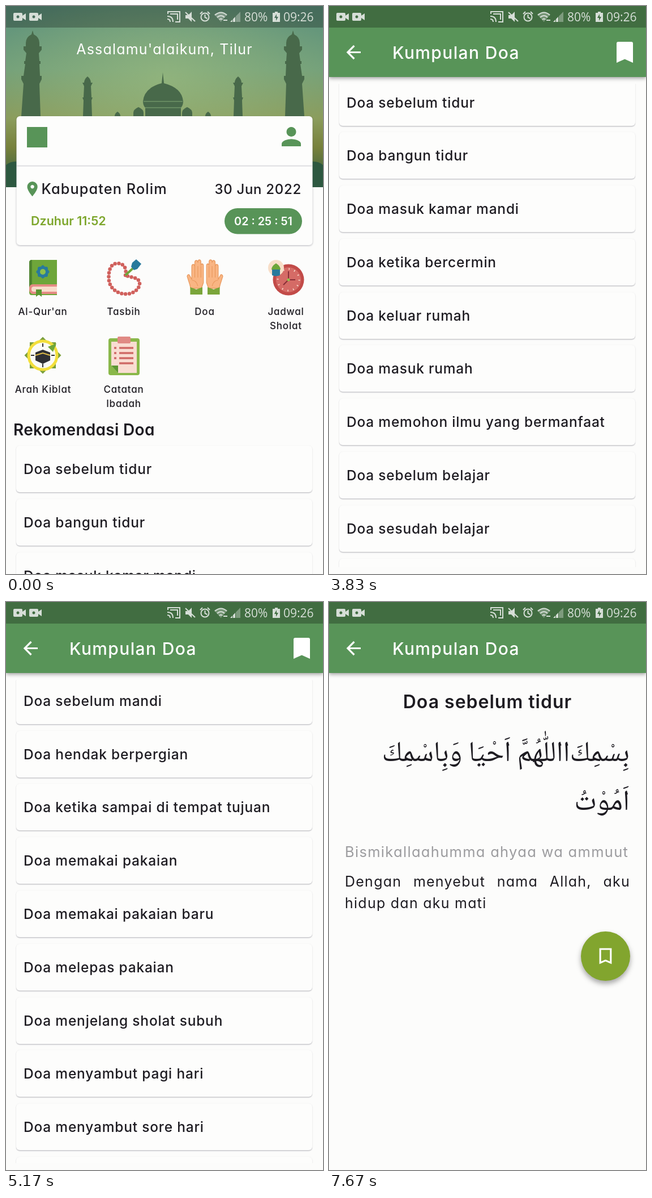
These frames come from a looping animation (560x1000 px, 8 s). An HTML page:

```html
<!DOCTYPE html>
<html lang="id">
<head>
<meta charset="utf-8">
<title>Doa</title>
<style>
:root { --green: #589458; --lime: #82a52e; --paper: #fcfcfb; --ink: #1e1c22; }
html, body { margin: 0; width: 100%; height: 100%; overflow: hidden; background: var(--paper); }
body { font-family: Inter, "Open Sans", sans-serif; font-feature-settings: "cv11"; font-optical-sizing: none; color: var(--ink); }
#stage { position: relative; width: 560px; height: 1000px; overflow: hidden; }
#stage > *, .page > * { position: absolute; }
.page { inset: 0; background: var(--paper); overflow: hidden; }
.scrim { inset: 0; background: #000; opacity: 0; }
svg { display: block; left: 0; top: 0; overflow: visible; }

.card { position: relative; box-sizing: border-box; width: 523px; height: 82px; margin: 0 0 11.8px 6px; padding-left: 13px;
  border-radius: 6px; background: #fdfdfc; font: 500 24.5px/82px Inter, "Open Sans", sans-serif; letter-spacing: .8px; white-space: nowrap;
  box-shadow: 0 1.5px 1.5px rgba(60, 60, 80, .28), 0 0 2px rgba(0, 0, 0, .07); }
.rows { padding-top: 6.5px; }
#view { left: 12px; top: 137px; width: 536px; height: 851px; overflow: hidden; }
#picks { left: 12px; top: 774px; }
.press { background: #000; opacity: 0; position: absolute; inset: 0; border-radius: 6px; }

.bar { left: 0; top: 0; width: 560px; height: 125px; background: var(--green); box-shadow: 0 2px 7px rgba(0, 0, 0, .4); }
.bar b { position: absolute; left: 112px; top: 62px; font: 500 30px/40px Inter, "Open Sans", sans-serif; letter-spacing: 1.35px; color: #fff; white-space: nowrap; }
.bar svg { position: absolute; }

.home text { font-size: 24px; font-weight: 500; letter-spacing: .7px; fill: var(--ink); }
.home .label text { font-size: 17px; letter-spacing: .8px; text-anchor: middle; }
.home .timer text { font-size: 19.8px; font-weight: 600; letter-spacing: 0; fill: #fff; text-anchor: middle; }

h1 { margin: 0; width: 560px; top: 156px; text-align: center; font: 600 32px/40px Inter, "Open Sans", sans-serif; letter-spacing: 1px; }
.arabic { margin: 0; right: 29px; top: 226px; direction: rtl; white-space: nowrap; font: 50.5px/86px "Noto Naskh Arabic", "DejaVu Sans", sans-serif; }
.latin, .meaning { margin: 0; left: 28px; font-size: 25px; line-height: 37.5px; letter-spacing: 1.25px; }
.latin { top: 421px; font-size: 25.5px; letter-spacing: 1.3px; color: #9c9c9f; white-space: nowrap; }
.meaning { top: 474px; width: 504px; text-align: justify; }
.fab { left: 445px; top: 580px; width: 87px; height: 87px; border-radius: 50%; background: var(--lime); box-shadow: 0 5px 10px rgba(0, 0, 0, .35); }
</style>
</head>
<body>
<div id="stage">

<div class="page home" id="home">
  <svg width="560" height="1000">
    <defs>
      <linearGradient id="sky" x2="0" y2="1">
        <stop offset="0" stop-color="#5d917c"/><stop offset=".35" stop-color="#73a07a"/>
        <stop offset=".62" stop-color="#8b9c5c"/><stop offset=".78" stop-color="#77813c"/><stop offset="1" stop-color="#2f5c42"/>
      </linearGradient>
      <radialGradient id="glare" cx=".5" cy=".4" r=".55">
        <stop offset="0" stop-color="#98b97f" stop-opacity=".75"/><stop offset="1" stop-color="#98b97f" stop-opacity="0"/>
      </radialGradient>
      <g id="towers">
        <path d="M47 43l2 7q10 5 10 15v6h4v6l-5 6 1 14h2v5h-2l1 21h3v6l-4 8 2 57H27l4-57-4-8v-6h4l3-21h-2v-5h2l2-14-5-6v-6h4v-6q0-10 10-15z"/>
        <path d="M144 124q6 5 6 11h3l-3 6 1 20h2l-2 5 1 28h-16l1-28-2-5h2l1-20-3-6h3q0-6 6-11z"/>
        <path d="M225 194v-6q0-6 9-10 9 4 9 10v6zM192 194q0-5 5-8 5 3 5 8z"/>
      </g>
      <g id="hand" transform="translate(32 0) scale(.9 1)">
        <path d="M327 497l-2-7-5-14q1-4 4-3l5 8v-22q0-4 3-4t3 4v-7q0-4 3-4t3 4v-1q0-4 3-4t3 4v6q0-3 2.500-3t2.500 4v29l-4 10z" fill="#f9b583" stroke="#e8985c" stroke-width="1.300"/>
        <path d="M335 458v20m6-20v20m6-20v20m-17 5q8 0 11 10" fill="none" stroke="#e8985c" stroke-width="1.200"/>
        <path d="M326 495l12 4 12-4v13h-24z" fill="#7ba53a"/>
      </g>
    </defs>
    <rect width="560" height="319" fill="url(#sky)"/>
    <rect width="560" height="319" fill="url(#glare)"/>
    <g fill="#48694a">
      <use href="#towers"/><use href="#towers" transform="translate(554) scale(-1 1)"/>
      <path d="M277 117l2 19q32 8 34 32 0 7-4 11v15h-63v-15q-4-4-4-11 2-24 33-32z"/>
      <path d="M0 280q12-10 30-4h500q18-6 30 4v39H0z" fill="#2d5840"/>
    </g>
    <path d="M243 168h69M246 179h64" stroke="#6f9468" stroke-width="1.500"/>
    <text x="280" y="85" text-anchor="middle" style="fill:#fff;font-weight:400;font-size:25px;letter-spacing:1.2px">Assalamu'alaikum, Tilur</text>

    <rect x="18.500" y="194" width="523" height="227" rx="6" fill="#fdfdfc" style="filter:drop-shadow(0 1.500px 1.500px rgba(50,50,70,.35))"/>
    <path d="M19 281.500h522" stroke="#dedee2" stroke-width="2"/>
    <g fill="#589458">
      <rect x="37" y="213" width="36" height="36"/>
      <path transform="translate(478.500 204.500) scale(2.125)" d="M12 4a4 4 0 1 0 .01 0zM12 14c-2.700 0-8 1.300-8 4v2h16v-2c0-2.700-5.300-4-8-4z"/>
      <path transform="translate(31 306.500) scale(1.300)" fill-rule="evenodd" d="M12 2a7 7 0 0 0-7 7c0 5.300 7 13 7 13s7-7.700 7-13a7 7 0 0 0-7-7zm0 4.500a2.500 2.500 0 1 1-.01 0z"/>
      <rect x="386" y="356" width="137" height="45.500" rx="22.750"/>
    </g>
    <text x="62.500" y="331" style="font-size:25.3px;letter-spacing:1.1px">Kabupaten Rolim</text>
    <text x="522" y="331" text-anchor="end">30 Jun 2022</text>
    <text x="44" y="386" style="font-size:21.5px;font-weight:600;letter-spacing:0;fill:#7da62c">Dzuhur 11:52</text>
    <g class="timer">
      <text id="before" x="454.500" y="386">02 : 25 : 51</text>
      <text id="after" x="454.500" y="386">02 : 25 : 50</text>
    </g>

    <!-- book -->
    <path d="M45 447h45v62H45q-4 0-4-5v-52q0-5 4-5z" fill="#6ea63a"/>
    <path d="M41 452q0-5 5-5v44q-5 0-5 6z" fill="#4f8430"/>
    <path d="M90 490H47q-6 0-6 8t6 9h43z" fill="#e58a84"/>
    <path d="M90 494H49q-4 0-4 4.500t4 4.500h41z" fill="#f8dccb"/>
    <path d="M53 499h10v13l-5-4-5 4z" fill="#5c9632"/>
    <g fill="#287a9c"><rect x="56" y="459" width="18" height="18" rx="3"/><rect x="56" y="459" width="18" height="18" rx="3" transform="rotate(45 65 468)"/></g>
    <circle cx="65" cy="468" r="5" fill="#8fc04a"/>
    <!-- beads -->
    <path d="M211 474C214 459 206 453 197 453 184 453 180 468 182 484 185 500 200 508 214 507 227 506 237 497 236 487 234 477 222 479 211 474" fill="none" stroke="#d0605c" stroke-width="6.500" stroke-linecap="round" stroke-dasharray="0 6.800"/>
    <path d="M211 474l13-12" stroke="#6ea63a" stroke-width="4"/>
    <path d="M221 459l5 6 6-2 7-9-9-8-7 6z" fill="#287a9c"/>
    <!-- hands -->
    <use href="#hand"/><use href="#hand" transform="translate(703) scale(-1 1)"/>
    <!-- clock -->
    <circle cx="499" cy="482" r="27.500" fill="#c24b48"/><circle cx="499" cy="482" r="22" fill="#d56b66"/>
    <circle cx="499" cy="482" r="19" fill="none" stroke="#fbe3d3" stroke-width="3" stroke-dasharray="1.500 8.448"/>
    <path d="M499 467v15h12M499 482l-9 9" fill="none" stroke="#8a2f38" stroke-width="2"/><circle cx="499" cy="482" r="2.500" fill="#8fc04a"/>
    <circle cx="477" cy="461" r="14" fill="#f8dec8"/>
    <path d="M469 464q0-6 8-11 8 5 8 11z" fill="#6ea63a"/><path d="M470 464h14v10q-7 3-14 0z" fill="#287a9c"/>
    <!-- compass -->
    <g fill="#7a9f3c"><rect x="42" y="592" width="46" height="46"/><rect x="42" y="592" width="46" height="46" transform="rotate(45 65 615)"/></g>
    <circle cx="65" cy="615" r="25" fill="#fbfbf6" stroke="#f3df3c" stroke-width="5"/>
    <path d="M65 594v6m0 30v6M44 615h6m30 0h6" stroke="#333" stroke-width="2"/>
    <path d="M74 600l15-6-6 15z" fill="#6ea63a"/>
    <path d="M52 610l13-5 13 5v14l-13 6-13-6z" fill="#303034"/><path d="M52 615l13-4 13 4" fill="none" stroke="#e0bd4a" stroke-width="2"/>
    <!-- clipboard -->
    <path d="M185 585h47q4 0 4 4v57q0 4-4 4h-47q-4 0-4-4v-57q0-4 4-4z" fill="#8ab84a"/>
    <path d="M186 591h45v55h-33l-12-13z" fill="#f9ddd2"/><path d="M186 633h12v13z" fill="#5c9632"/>
    <rect x="197" y="582" width="23" height="12" rx="2" fill="#e08a84"/>
    <path d="M200 602h25m-25 9h25m-25 9h25m-25 9h25" stroke="#cf6a66" stroke-width="3.500"/><path d="M191 602h4m-4 9h4m-4 9h4" stroke="#cf6a66" stroke-width="3.500"/>

    <g class="label">
      <text x="65" y="544">Al-Qur'an</text><text x="208" y="544">Tasbih</text><text x="351" y="544">Doa</text>
      <text x="494.500" y="544">Jadwal</text><text x="494.500" y="569">Sholat</text>
      <text x="65.500" y="681">Arah Kiblat</text><text x="208" y="681">Catatan</text><text x="208" y="706">Ibadah</text>
    </g>
    <text x="13" y="756" style="font-size:28px;font-weight:600;letter-spacing:.3px">Rekomendasi Doa</text>
    <rect id="tap" x="299" y="446" width="106" height="134" opacity="0"/>
  </svg>
  <div id="picks"></div>
</div>

<div class="scrim" id="shade1"></div>
<div class="page" id="list">
  <div id="view"><div class="rows" id="rows"></div></div>
  <svg width="560" height="1000">
    <circle id="spin" cx="280" cy="562" r="28" pathLength="100" fill="none" stroke="#589458" stroke-width="6.200" stroke-linecap="square" style="transform-origin:280px 562px"/>
    <path id="glow" d="M12 137H548V163Q280 199 12 163z" fill="#82a52e" fill-opacity=".12" style="transform-origin:280px 137px"/>
  </svg>
  <div class="bar"></div>
</div>

<div class="scrim" id="shade2"></div>
<div class="page" id="detail">
  <div class="bar"></div>
  <h1>Doa sebelum tidur</h1>
  <p class="arabic" lang="ar">بِسْمِكَ&zwnj;االلّٰهُمَّ اَحْيَا وَبِاسْمِكَ<br>اَمُوْتُ</p>
  <p class="latin">Bismikallaahumma ahyaa wa ammuut</p>
  <p class="meaning">Dengan menyebut nama Allah, aku hidup dan aku mati</p>
  <div class="fab"><svg width="87" height="87"><path transform="translate(24.800 24.800) scale(1.556)" fill="none" stroke="#fff" stroke-width="2" d="M6 4h12v15.500l-6-2.600-6 2.600z"/></svg></div>
</div>

<svg id="status" width="560" height="38">
  <rect width="560" height="38" fill="#000" fill-opacity=".26"/>
  <g fill="#d6ded7">
    <path id="cam" d="M15 12h12q2 0 2 2v3l6-4v12l-6-4v3q0 2-2 2H15q-2 0-2-2V14q0-2 2-2zm6 4.500a2.500 2.500 0 1 0 .01 0z"/>
    <use href="#cam" x="28"/>
    <path d="M317 16h5l6-6v18l-6-6h-5z"/>
    <path d="M368 15q11.500-9 23 0l-11.500 13z" opacity=".35"/>
    <path d="M396 28l4-4v4zM401 28v-5l4-4v9z"/><path d="M406 28V18l8-8v18z" opacity=".4"/>
    <path fill-rule="evenodd" d="M471 12h4v-2h5v2h4v16h-13zm7 2l-4 7h3v5l4-7h-3z"/>
    <g font-family="Open Sans, sans-serif" font-size="21"><text x="421" y="27">80%</text><text x="490" y="27">09:26</text></g>
  </g>
  <g fill="none" stroke="#d6ded7" stroke-width="2">
    <path d="M286 14v-4h21v18h-8M285 18q10 0 10 10M285 23q5 0 5 5M290 14h13v10"/>
    <path d="M317 11l17 16"/>
    <circle cx="351.500" cy="19.500" r="7"/><path d="M351.500 15v5l4 2M343 14l4-4m9 0l4 4"/>
    <path d="M369 16q11-9 21 0M373 20q7-6 13 0M377 24q3-3 5 0M384 25h7"/>
  </g>
</svg>
</div>

<script>
const $ = id => document.getElementById(id);
const FRAMES = 96;   // 12 per second, 8 seconds

// Animates one property through [frame, value] points, one step per frame.
function move(id, prop, points) {
  const all = [...points];
  if (all[0][0] > 0) all.unshift([0, all[0][1]]);
  all.push([FRAMES, all[all.length - 1][1]]);
  const keys = all.map(([frame, value], i) => ({
    offset: frame / FRAMES,
    [prop]: value,
    easing: i + 1 < all.length ? `steps(${all[i + 1][0] - frame})` : 'linear'
  }));
  $(id).animate(keys, { duration: 8000, iterations: Infinity, delay: -5 });
}

const show = (id, frame, value = 1) => move(id, 'opacity', [[frame - 1, 0], [frame, value]]);
const hide = (id, frame) => move(id, 'opacity', [[frame - 1, 1], [frame, 0]]);

// Page change: the new page grows and fades in over the old one.
function zoom(from, shade, to, start) {
  const at = values => values.map((v, i) => [start + i, v]);
  move(to, 'opacity', at([0, .8, 1]));
  move(to, 'transform', at([.85, .932, .989, .998, 1].map(s => `scale(${s})`)));
  move(from, 'scale', at(['1', '1.03', '1.046', '1.049', '1.05']));
  move(shade, 'opacity', at([0, .05, .6]));
}

const prayers = ['sebelum tidur', 'bangun tidur', 'masuk kamar mandi', 'ketika bercermin', 'keluar rumah', 'masuk rumah',
  'memohon ilmu yang bermanfaat', 'sebelum belajar', 'sesudah belajar', 'sebelum wudhu', 'setelah wudhu',
  "sebelum membaca al-qur'an", "setelah membaca al-qur'an", 'sebelum mandi', 'hendak berpergian',
  'ketika sampai di tempat tujuan', 'memakai pakaian', 'memakai pakaian baru', 'melepas pakaian',
  'menjelang sholat subuh', 'menyambut pagi hari', 'menyambut sore hari', 'bercermin',
  'masuk masjid', 'keluar masjid', 'naik kendaraan'];
const card = name => `<div class="card">Doa ${name}</div>`;
$('rows').innerHTML = prayers.map(card).join('');
$('picks').innerHTML = prayers.slice(0, 3).map(card).join('');
$('rows').firstChild.insertAdjacentHTML('beforeend', '<i class="press" id="press"></i>');

const mark = '<path d="M511 63h23q3 0 3 3v34l-14.500-6.500L508 100V66q0-3 3-3z" fill="#fff"/>';
document.querySelectorAll('.bar').forEach((bar, i) => {
  bar.innerHTML = `<svg width="560" height="125"><path d="M56 81.500H33M44.500 70L33 81.500 44.500 93" fill="none" stroke="#fff" stroke-width="3.200"/>${i ? '' : mark}</svg><b>Kumpulan Doa</b>`;
});

hide('before', 11);
show('after', 11);
show('tap', 20, .1);
hide('picks', 21);
zoom('home', 'shade1', 'list', 20);

move('spin', 'strokeDasharray', [[21, '0.2 100'], [23, '10 100'], [25, '42 100'], [27, '64 100'], [30, '75 100']]);
move('spin', 'transform', [[21, 'rotate(-90deg)'], [30, 'rotate(50deg)']]);
hide('spin', 30);
show('rows', 30);

const scroll = [[45, 0], [46, 15], [48, 190], [51, 440], [55, 621.5], [57, 690], [59, 930], [62, 1230],
  [64, 1325], [66, 1330], [68, 1260], [70, 820], [72, 300], [74, 0]];
move('rows', 'transform', scroll.map(([frame, y]) => [frame, `translateY(${-y}px)`]));

move('glow', 'opacity', [[73, 0], [74, .4], [76, 1], [77, 1], [82, 0]]);
move('glow', 'transform', [[73, 'scaleY(.1)'], [76, 'scaleY(1)'], [77, 'scaleY(1)'], [82, 'scaleY(.1)']]);

show('press', 87, .07);
zoom('list', 'shade2', 'detail', 87);
</script>
</body>
</html>
```
